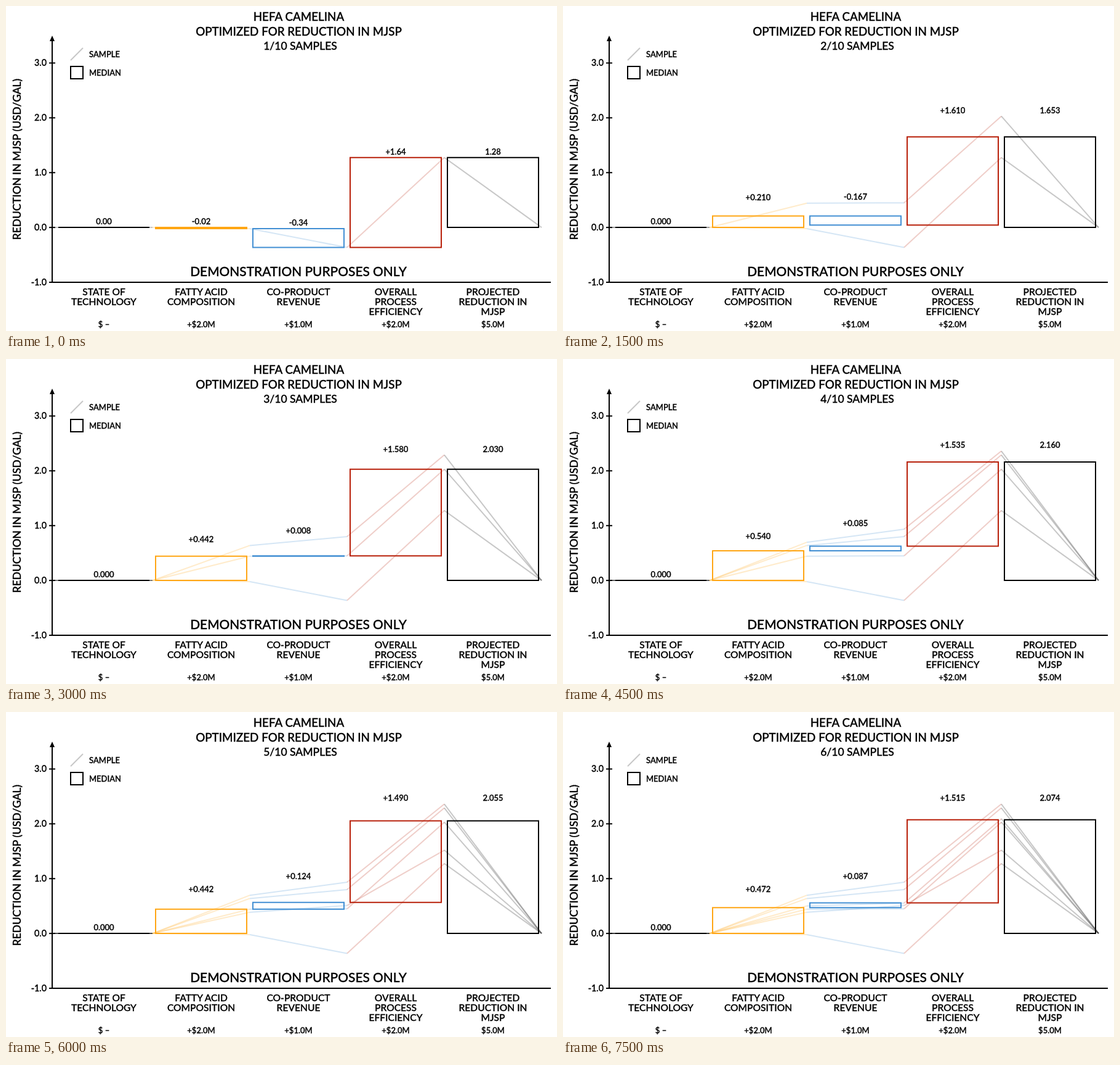
Write an HTML page that moves like this. It is 895 px wide and 527 px high and loops after 8000 ms.

```html
<!DOCTYPE html>
<html lang="en">
<head>
<meta charset="utf-8">
<title>Waterfall of sample medians</title>
<style>
  html, body { margin: 0; width: 100%; height: 100%; overflow: hidden; background: #fff; }
  svg { display: block; width: 895px; height: 527px; }
  text { font: 500 13px Lato, sans-serif; text-anchor: middle; fill: #000; stroke: #000; stroke-width: .35px; }
  path { fill: none; stroke-width: 2; }
  .title { font-size: 18.8px; }
  .count { font-size: 17.5px; }
  .notice { font-size: 20.9px; }
  .axis-name { font-size: 17.4px; }
  .category { font-size: 15.6px; }
  .tick { font-size: 14.3px; text-anchor: end; }
  .key { text-anchor: start; }
  .axis { stroke: #000; }
  .sample { stroke-opacity: .22; }
</style>
</head>
<body>
<svg viewBox="0 0 895 527">
  <text class="title" x="475.5" y="24">HEFA CAMELINA</text>
  <text class="title" x="475.5" y="48">OPTIMIZED FOR REDUCTION IN MJSP</text>
  <text class="count" id="count" x="478" y="71"></text>
  <path class="sample" stroke="#000" d="M105 88L125 68"/>
  <path class="axis" d="M105 98h20v20h-20z"/>
  <text class="key" x="135" y="82.5">SAMPLE</text>
  <text class="key" x="135" y="112.5">MEDIAN</text>
  <text class="axis-name" transform="translate(24 248.5) rotate(-90)">REDUCTION IN MJSP (USD/GAL)</text>
  <text class="notice" x="475" y="438">DEMONSTRATION PURPOSES ONLY</text>
  <g id="chart"></g>
  <g id="frame"></g>
</svg>
<script>
const STEP = 1500, LOOP = 8000;
const LEFT = 80, PITCH = 158, GAP = 5;
const BOTTOM = 448, HEIGHT = 400, MIN = -1, MAX = 3.5;

const columns = [
  { lines: ['STATE OF', 'TECHNOLOGY'], cost: '$ –', color: '#000' },
  { lines: ['FATTY ACID', 'COMPOSITION'], cost: '+$2.0M', color: '#ffa614' },
  { lines: ['CO-PRODUCT', 'REVENUE'], cost: '+$1.0M', color: '#428fd3' },
  { lines: ['OVERALL', 'PROCESS', 'EFFICIENCY'], cost: '+$2.0M', color: '#b8200a' },
  { lines: ['PROJECTED', 'REDUCTION IN', 'MJSP'], cost: '$5.0M', color: '#000' },
];

// Contribution of each of the three middle columns, per sample
const samples = [
  [-.022, -.342, 1.64],
  [.4418, .008, 1.58],
  [.638, .162, 1.49],
  [.697, .238, 1.425],
  [.386, .1236, 1.01],
  [.502, .05, 1.54],
];

const byId = id => document.getElementById(id);
const toY = value => BOTTOM - HEIGHT * (value - MIN) / (MAX - MIN);
const edgeX = i => LEFT + PITCH * i;
const centerX = i => edgeX(i) + PITCH / 2;
const label = (cls, x, y, text) => `<text class="${cls}" x="${x}" y="${y}">${text}</text>`;
const path = (cls, color, d) => `<path class="${cls}" stroke="${color}" d="${d}"/>`;

function median(values) {
  const sorted = [...values].sort((a, b) => a - b), n = sorted.length;
  return (sorted[(n - 1) >> 1] + sorted[n >> 1]) / 2;
}

// Running levels at the six column edges; the last column falls back to zero
function levels([a, b, c]) {
  return [0, 0, a, a + b, a + b + c, 0];
}

function drawFrame() {
  let out = path('axis', '#000', `M75 ${BOTTOM}V54M74 ${BOTTOM}H885`) +
    '<path d="M75 48l4 9h-8z" style="fill:#000"/>';
  for (let v = MIN; v <= MAX; v++) {
    const y = toY(v);
    out += path('axis', '#000', `M70 ${y}h10`) + label('tick', 66, y + 5, v.toFixed(1));
  }
  columns.forEach(({ lines, cost }, i) => {
    lines.forEach((line, row) => out += label('category', centerX(i), 469 + 16 * row, line));
    out += label('cost', centerX(i), 521, cost);
  });
  byId('frame').innerHTML = out;
}

function drawChart(count) {
  const shown = samples.slice(0, count);
  const paths = shown.map(levels);
  const medians = [0, 1, 2].map(k => median(shown.map(s => s[k])));
  const mid = levels(medians);
  const values = [0, ...medians, mid[4]];
  let lines = '', boxes = '', labels = '';

  columns.forEach(({ color }, i) => {
    for (const p of paths) {
      lines += path('sample', color, `M${edgeX(i)} ${toY(p[i])}L${edgeX(i + 1)} ${toY(p[i + 1])}`);
    }
    const x = edgeX(i) + GAP;
    boxes += path('median', color,
      `M${x} ${toY(mid[i])}h${PITCH - 2 * GAP}V${toY(mid[i + 1])}H${x}z`);

    const top = Math.max(...paths.flatMap(p => [p[i], p[i + 1]]), mid[i], mid[i + 1]);
    const isChange = i > 0 && i < 4;
    const sign = isChange && values[i] > 0 ? '+' : '';
    labels += label('value', centerX(i), toY(top) - 5,
      sign + values[i].toFixed(count === 1 ? 2 : 3));
  });
  byId('chart').innerHTML = lines + boxes + labels;
  byId('count').textContent = `${count}/10 SAMPLES`;
}

let drawn = 0;
function tick() {
  const count = 1 + Math.floor(performance.now() % LOOP / STEP);
  if (count !== drawn) drawChart(drawn = count);
  requestAnimationFrame(tick);
}

drawFrame();
tick();
</script>
</body>
</html>
```
